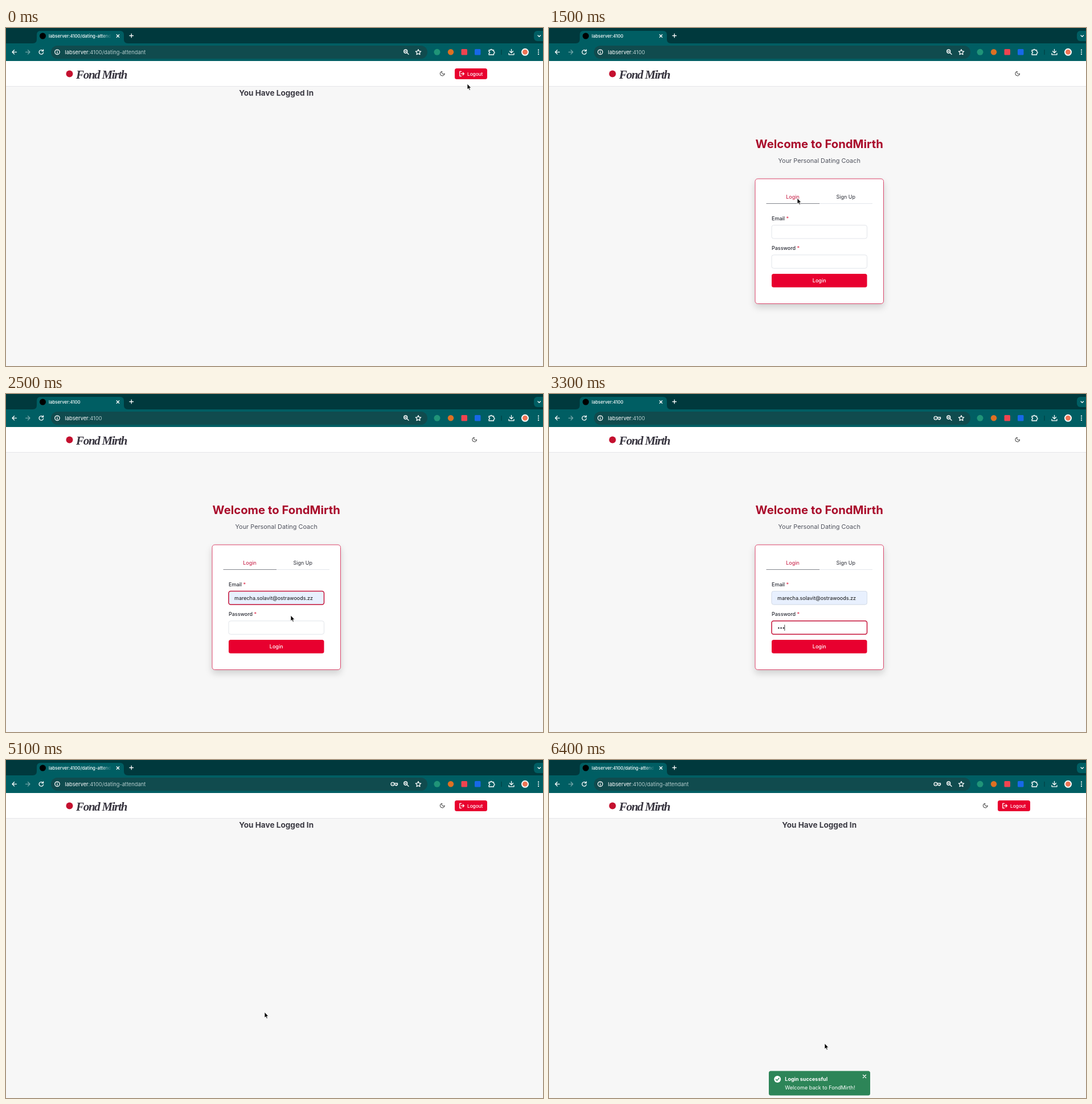
An HTML page for the animation above (6.6 s loop, 943x594 px).

```html
<!DOCTYPE html>
<html lang="en">
<head>
<meta charset="utf-8">
<title>Login demo</title>
<style>
  html, body { margin: 0; width: 100%; height: 100%; overflow: hidden; background: #f7f7f7; }
  svg { display: block; width: 943px; height: 594px; font: 9px Inter, sans-serif; }
  .line { fill: none; stroke: #fff; stroke-width: 1.3; stroke-linecap: round; stroke-linejoin: round; }
  .dark { stroke: #333; stroke-width: 2.3; }
  .mid { text-anchor: middle; }
  .semi { font-weight: 600; }
  .bold { font-weight: 700; }
  .field { fill: #fff; stroke: #e2e5ea; }
  .focus { fill: none; stroke: #c8143a; stroke-width: 1.5; }
  .red { fill: #e8002f; }
  .hover { fill: #c5002a; }
</style>
</head>
<body>
<svg viewBox="0 0 943 594">
  <defs>
    <linearGradient id="fade" x1="0" x2="1">
      <stop stop-color="#005e63" stop-opacity="0"/><stop offset="1" stop-color="#005e63"/>
    </linearGradient>
    <filter id="shadow" x="-20%" y="-20%" width="140%" height="150%">
      <feDropShadow dx="0" dy="6" stdDeviation="6" flood-opacity=".16"/>
    </filter>
    <path id="moon" d="M21 12.8A9 9 0 1 1 11.2 3 7 7 0 0 0 21 12.8z" class="line dark" transform="scale(.43)"/>
  </defs>

  <!-- Browser chrome -->
  <rect width="943" height="28" fill="#00393d"/>
  <rect y="27" width="943" height="31" fill="#005e63"/>
  <path d="M47 27q7 0 7-7v-8q0-7 7-7h139q7 0 7 7v8q0 7 7 7z" fill="#005e63"/>
  <circle cx="64.500" cy="14" r="5.500"/>
  <g fill="#fff" font-size="7.800" font-weight="500">
    <text x="75" y="16.500">labserver:4100<tspan data-on="0-900 5100-6600">/dating-attendant</tspan></text>
  </g>
  <rect x="168" y="7" width="17" height="14" fill="url(#fade)"/>
  <rect x="185" y="7" width="20" height="14" fill="#005e63"/>
  <path class="line" d="M194.300 11.800l4.400 4.400m0-4.400l-4.400 4.400M217 13.500h6.500m-3.250-3.250v6.500"/>
  <rect x="927" y="5" width="24" height="18" rx="6" fill="#005e63"/>
  <path class="line" d="M934 13l2.300 2.200 2.300-2.200"/>
  <path class="line" d="M18.500 42.300h-7.500m3.500-3.500l-3.500 3.500 3.500 3.500"/>
  <path class="line" d="M34.500 42.300h7.500m-3.500-3.500l3.500 3.500-3.500 3.500" opacity=".45"/>
  <path class="line" d="M65 40.200a3.800 3.800 0 1 0 .6 3M65.500 38v2.700h-2.700"/>
  <rect x="79" y="31" width="661" height="23" rx="11.500" fill="#104b4e"/>
  <g class="line" stroke-width="1.100">
    <circle cx="90" cy="42.300" r="4.200"/>
    <path d="M90 42v2.300m0-4.400v.1"/>
    <circle cx="701.700" cy="41" r="3"/>
    <path d="M704 43.300l3 3m-6.700-5.300h2.800"/>
    <path d="M724 37.700l1.400 3 3.300.4-2.400 2.300.6 3.200-2.900-1.600-2.900 1.600.6-3.200-2.400-2.300 3.300-.4z"/>
    <g data-on="3000-6600">
      <circle cx="679" cy="42.300" r="2.900"/>
      <path d="M679 42.300h.1M682 41h5.500v2.700h-1.200v1.100h-2v-1.100h-2.300"/>
    </g>
    <path d="M848 39h2.600a1.500 1.500 0 0 1 3 0h2.900v2.700a1.500 1.500 0 0 1 0 3v2.300h-8.500v-2.500a1.500 1.500 0 0 0 0-3z"/>
    <path d="M887.500 37.500v6m-3-2.700l3 3 3-3m-7.500 3.700v2.300h9v-2.300"/>
  </g>
  <text x="103.500" y="45.700" font-size="9.300" fill="#fff">labserver<tspan fill="#b4cccd">:4100<tspan data-on="0-900 5100-6600">/dating-attendant</tspan></tspan></text>
  <circle cx="757" cy="42.300" r="5.500" fill="#1f9478"/>
  <circle cx="781" cy="42.300" r="5.200" fill="#dd7023"/>
  <rect x="799.500" y="37" width="10.500" height="10.500" rx="1.500" fill="#ef4450"/>
  <rect x="823" y="37" width="10.500" height="10.500" rx="1.500" fill="#1768e8"/>
  <path d="M870 38v9" stroke="#004246" stroke-width="1.300"/>
  <circle cx="911.500" cy="42.300" r="5.500" fill="#ef7455" stroke="#fff" stroke-width="2"/>
  <g fill="#fff"><circle cx="935" cy="38.700" r="1.100"/><circle cx="935" cy="42.300" r="1.100"/><circle cx="935" cy="45.900" r="1.100"/></g>

  <!-- Page header -->
  <rect y="58" width="943" height="44.500" fill="#fff"/>
  <path d="M0 102.500h943" stroke="#e6e6e8"/>
  <circle cx="111.500" cy="80.500" r="6" fill="#c4102f"/>
  <text x="123" y="88.500" fill="#37343f" style="font:italic 700 21px 'Liberation Serif',serif;letter-spacing:-1.300px">Fond Mirth</text>
  <g data-on="0-900 5100-6600">
    <use href="#moon" x="761" y="75"/>
    <rect class="red" x="788" y="71" width="57" height="19" rx="3.500"/>
    <rect class="hover" x="788" y="71" width="57" height="19" rx="3.500" data-on="300-900"/>
    <path class="line" stroke-width="1" d="M799.500 76.300h-2.700v8.200h2.700m0-4.100h5m-2.300-2.300l2.300 2.300-2.300 2.300"/>
    <text x="810" y="83.500" font-size="8.200" font-weight="500" fill="#fff">Logout</text>
  </g>
  <use href="#moon" x="817.500" y="75" data-on="900-5100"/>
  <text class="mid bold" x="474.700" y="118.500" font-size="13.600" fill="#3b3a43" data-on="0-1000 5100-6600">You Have Logged In</text>

  <!-- Login page -->
  <g data-on="1000-5100" fill="#2b2d36">
    <text class="mid bold" x="474.700" y="211.300" font-size="20.300" fill="#a90b2a">Welcome to FondMirth</text>
    <text class="mid" x="474.700" y="237" font-size="10.900" fill="#50535e">Your Personal Dating Coach</text>
    <rect x="362" y="265" width="225.500" height="219.500" rx="4.500" fill="#fff" stroke="#d9456a" filter="url(#shadow)"/>
    <text class="mid" x="428" y="300" fill="#c4103a">Login</text>
    <text class="mid" x="521.300" y="300">Sign Up</text>
    <path d="M475 308.500h93" stroke="#e3e6eb"/>
    <path d="M381.500 308.500h93.500" stroke="#83858c"/>
    <text x="391" y="338" font-weight="500">Email <tspan fill="#e0314f">*</tspan></text>
    <rect class="field" x="391" y="346.500" width="167.500" height="23.500" rx="3.500"/>
    <rect x="391" y="346.500" width="167.500" height="23.500" rx="3.500" fill="#e8f0fe" stroke="#d5dde9" data-on="2200-5100"/>
    <rect class="focus" x="391" y="346.500" width="167.500" height="23.500" rx="3.500" data-on="2000-2900"/>
    <path d="M401 353v10.500" stroke="#555" data-on="2000-2200"/>
    <text x="401" y="361.700" fill="#666" data-on="2200-2500">marecha.solavit@ostrawoods.zz</text>
    <text x="401" y="361.700" fill="#111" data-on="2500-5100">marecha.solavit@ostrawoods.zz</text>
    <text x="391" y="390.300" font-weight="500">Password <tspan fill="#e0314f">*</tspan></text>
    <rect class="field" x="391" y="398.800" width="167.500" height="23.500" rx="3.500"/>
    <rect class="focus" x="391" y="398.800" width="167.500" height="23.500" rx="3.500" data-on="2900-4800"/>
    <g id="dots"></g>
    <path id="caret" d="M0 405.500v10.500" stroke="#444" data-on="2900-4800"/>
    <rect class="red" x="391" y="432" width="167.500" height="23.700" rx="3.500"/>
    <rect class="hover" x="391" y="432" width="167.500" height="23.700" rx="3.500" data-on="4600-5100"/>
    <text class="mid" x="474.700" y="447.300" font-weight="500" fill="#fff">Login</text>
    <g data-on="2000-2500" fill="#181d1d">
      <rect x="456" y="376" width="161" height="124.500" rx="5" filter="url(#shadow)"/>
      <path d="M463.500 376.500l6-5.500 6 5.500z"/>
      <rect x="456" y="380" width="161" height="23" fill="#343a3a" data-on="2200-2500"/>
      <g class="semi" font-size="8.400" fill="#e9ecec">
        <text x="464" y="394">marecha.solavit@ostrawoo...</text>
        <text x="464" y="417.700">velika@ostrawoods.zz</text>
        <text x="464" y="441.500">marecha.solavit@ostrawoo...</text>
        <text x="464" y="465.200">marecha4083@pomel.zzz</text>
        <text x="464" y="489">officemanager@ostrawoods.zz</text>
      </g>
    </g>
  </g>

  <!-- Toast -->
  <g id="toast" fill="#fff">
    <rect x="386" y="546.500" width="178" height="43" rx="3.500" fill="#2d8558"/>
    <circle cx="401.200" cy="561" r="6"/>
    <path class="line" style="stroke:#2d8558" d="M398.500 561.200l2 2 3.500-4.200"/>
    <text class="bold" x="414.300" y="564.300">Login successful</text>
    <text x="414.300" y="578.500" font-size="9.100">Welcome back to FondMirth!</text>
    <path class="line" stroke-width="1" d="M551.500 553.500l5 5m0-5l-5 5"/>
  </g>

  <!-- Pointers, each with its hot spot at 0,0 -->
  <g id="cursor">
    <path data-on="0-300 1000-1700 2100-2800 5100-6600" d="M0 0v10l2.200-2 1.500 3.400 1.700-.8-1.500-3.200h3z" fill="#000" stroke="#fff" stroke-width=".8"/>
    <path data-on="300-1000 4600-5100" d="M-1.200-1q1-1.200 2 0l.8 3.200 1.500-.3 1.500.4 1.400.5.800 2.500-.5 4.700h-5.300l-3-4q-.8-1.700 1-1.200l1 .8z" fill="#fff" stroke="#111" stroke-width=".9" stroke-linejoin="round"/>
    <path data-on="1700-2100 2800-3100" d="M-2-5q2 0 2 1.500v7q0 1.500-2 1.500M2-5q-2 0-2 1.500v7q0 1.500 2 1.500M-1.200 1h2.400" fill="none" stroke="#222"/>
  </g>
</svg>
<script>
const LOOP = 6600, STEP = 100;
const $ = id => document.getElementById(id);

const timed = [...document.querySelectorAll('[data-on]')].map(el => ({
  el, spans: el.dataset.on.split(' ').map(s => s.split('-').map(Number))
}));

// Pointer stops: time, x, y
const path = [
  [0, 810, 98], [400, 821, 79], [800, 821, 79], [900, 821, 80], [1500, 436, 299],
  [1700, 415, 356], [2000, 415, 356], [2300, 500, 389], [2600, 500, 389],
  [2900, 472, 410], [4500, 462, 420], [4700, 454, 443], [5800, 454, 443],
  [6100, 484, 498], [LOOP, 484, 498]
];
const keyTimes = [3100, 3200, 3300, 3700, 3800, 4000, 4200, 4400, 4500];
const PITCH = 4.270;

const dots = keyTimes.map((_, i) => {
  const dot = document.createElementNS('http://www.w3.org/2000/svg', 'circle');
  dot.setAttribute('cx', 403.300 + i * PITCH);
  dot.setAttribute('cy', 411.300);
  dot.setAttribute('r', 1.200);
  return $('dots').appendChild(dot);
});

const clamp = v => Math.min(1, Math.max(0, v));
const easeInOut = v => v * v * (3 - 2 * v);

function pointerAt(t) {
  const i = path.findIndex(p => p[0] > t);
  const [t0, x0, y0] = path[i - 1], [t1, x1, y1] = path[i];
  const k = easeInOut((t - t0) / (t1 - t0));
  return [x0 + (x1 - x0) * k, y0 + (y1 - y0) * k];
}

function draw(t) {
  for (const { el, spans } of timed)
    el.style.display = spans.some(([a, b]) => t >= a && t < b) ? '' : 'none';

  const typed = keyTimes.filter(k => k <= t).length;
  dots.forEach((dot, i) => dot.style.display = i < typed ? '' : 'none');
  $('caret').setAttribute('transform', `translate(${401 + typed * PITCH})`);

  const shown = 1 - (1 - clamp((t - 5180) / 320)) ** 1.700;
  $('toast').setAttribute('opacity', shown);
  $('toast').setAttribute('transform', `translate(0 ${16 * (1 - shown)})`);

  $('cursor').setAttribute('transform', `translate(${pointerAt(t)})`);
}

function tick() {
  draw(Math.floor(performance.now() % LOOP / STEP) * STEP);
  requestAnimationFrame(tick);
}
tick();
</script>
</body>
</html>
```
